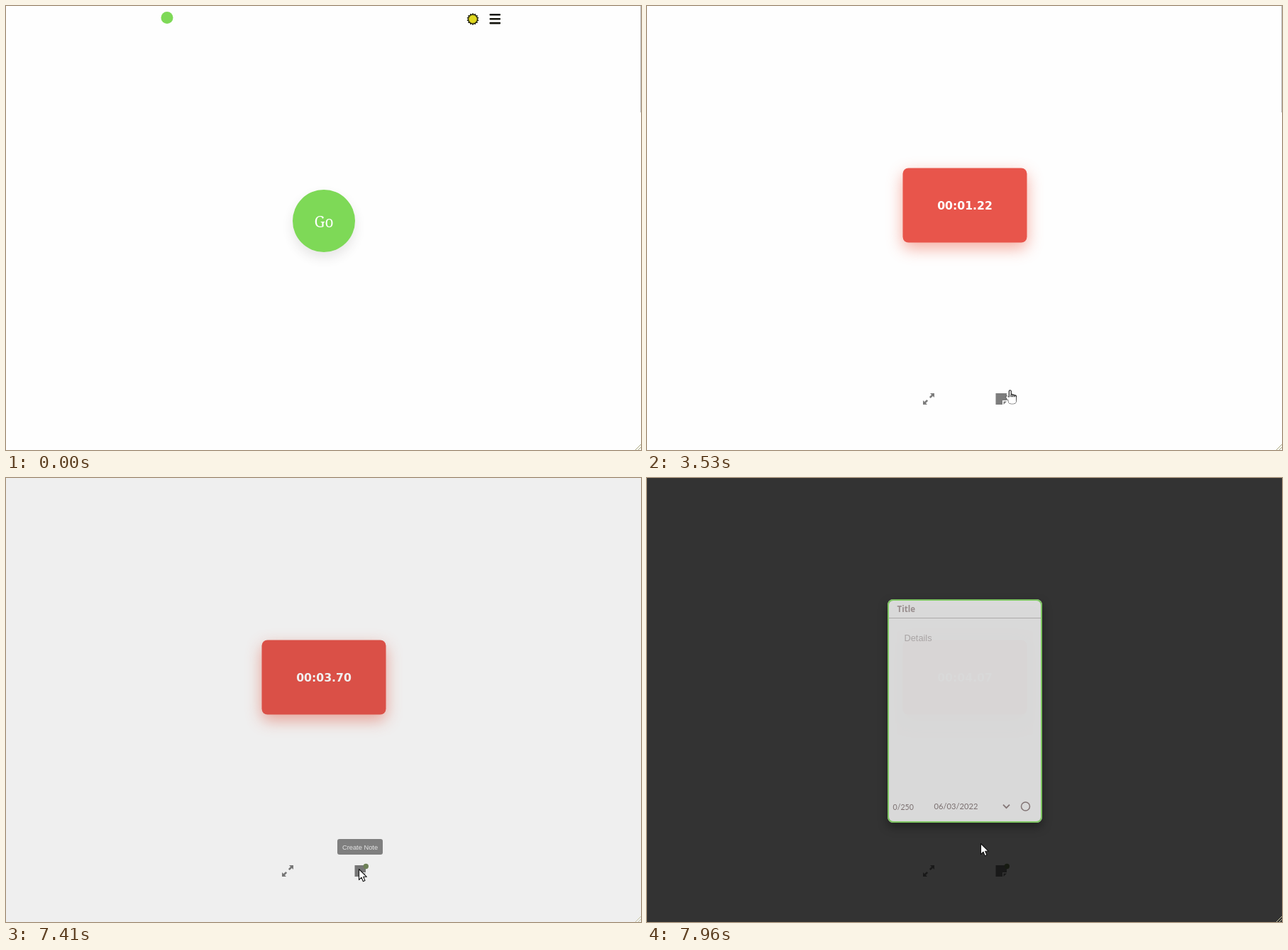
An HTML page with a canvas for the animation above (8000 ms loop, 895 by 626 pixels).

```html
<!DOCTYPE html>
<html lang="en">
<head>
<meta charset="utf-8">
<title>Timer</title>
<style>
html, body { margin: 0; width: 100%; height: 100%; overflow: hidden; background: #fff; }
canvas { display: block; }
</style>
</head>
<body>
<canvas id="stage" width="895" height="626"></canvas>
<script>
const W = 895, H = 626, LOOP = 8000, END = 7960;
const ctx = document.getElementById('stage').getContext('2d');

const SERIF = '"DejaVu Serif", serif';
const SANS = '"DejaVu Sans", sans-serif';
const ARIAL = '"Liberation Sans", sans-serif';
const LATO = 'Lato, sans-serif';

const GREEN = [126, 217, 87], BROWN = [172, 92, 52], RED = [232, 85, 75];
const START = 1636, CLICK = 7310, DIM = 7377, CARD = 7750;
const EXPAND = { x: 397, y: 554 }, NOTE = { x: 499, y: 554 };

// Timer readings: [time, seconds]
const CLOCK = [[START, 0], [3530, 1.22], [5670, 2.64], [7560, 3.8], [END, 4.07]];

// Pointer moves: [start, end, x, y]
const MOVES = [
  [220, 990, 455, 313],
  [1870, 2900, 563, 245],
  [2930, 3607, 510, 552],
  [3607, 3800, 500, 552],
  [4150, 4500, 394, 550],
  [4950, 5760, 497, 551],
  [7560, END, 470, 515]
];

const clamp = v => Math.max(0, Math.min(1, v));
const mix = (a, b, k) => a + (b - a) * k;
const mixRgb = (a, b, k) => a.map((v, i) => mix(v, b[i], k));
const rgb = (c, a = 1) => `rgba(${c.map(Math.round).join(',')},${a})`;
const ramp = (t, from, dur) => clamp((t - from) / dur);
const smooth = k => k * k * (3 - 2 * k);

// The CSS "ease" curve, solved by bisection
function ease(x) {
  let lo = 0, hi = 1;
  for (let i = 0; i < 20; i++) {
    const s = (lo + hi) / 2, q = 1 - s;
    if (.75 * q * s + s ** 3 < x) lo = s; else hi = s;
  }
  const q = 1 - lo;
  return .3 * q * q * lo + 3 * q * lo * lo + lo ** 3;
}

function pointerAt(t) {
  const p = { x: 824, y: 577 };
  for (const [from, to, x, y] of MOVES) {
    const k = smooth(ramp(t, from, to - from));
    p.x = mix(p.x, x, k);
    p.y = mix(p.y, y, k);
  }
  return p;
}

const near = (p, c, rx, ry = rx) => Math.abs(p.x - c.x) < rx && Math.abs(p.y - c.y) < ry;
const overIcon = (t, icon) => t > START && t < CLICK && near(pointerAt(t), icon, 13);

function overButton(t) {
  const p = pointerAt(t);
  return t < START ? Math.hypot(p.x - 448, p.y - 303) < 44 : near(p, { x: 448, y: 281 }, 87, 52);
}

function clockText(t) {
  const i = Math.max(1, CLOCK.findIndex(([time]) => t <= time));
  const [t0, v0] = CLOCK[i - 1], [t1, v1] = CLOCK[i];
  const cs = Math.floor(mix(v0, v1, ramp(t, t0, t1 - t0)) * 100 + 1e-6);
  const pad = n => String(n).padStart(2, '0');
  return `00:${pad(Math.floor(cs / 100))}.${pad(cs % 100)}`;
}

function text(str, x, y, font, color, align = 'center') {
  ctx.font = font;
  ctx.fillStyle = color;
  ctx.textAlign = align;
  ctx.fillText(str, x, y);
}

function box(x, y, w, h, r) {
  ctx.beginPath();
  ctx.roundRect(x, y, w, h, r);
}

function poly(points, close = true) {
  ctx.beginPath();
  points.forEach(([x, y]) => ctx.lineTo(x, y));
  if (close) ctx.closePath();
}

function disc(x, y, r) {
  ctx.beginPath();
  ctx.arc(x, y, r, 0, 7);
}

function layer(alpha, draw) {
  if (alpha <= 0) return;
  ctx.save();
  ctx.globalAlpha = alpha;
  draw();
  ctx.restore();
}

function shadow(color, blur, y) {
  ctx.shadowColor = color;
  ctx.shadowBlur = blur;
  ctx.shadowOffsetY = y;
}

function header() {
  ctx.fillStyle = rgb(GREEN);
  disc(227, 16.5, 8.5);
  ctx.fill();

  const spikes = Array.from({ length: 28 }, (_, i) => {
    const r = i % 2 ? 6 : 7.6, a = i * Math.PI / 14;
    return [658 + r * Math.sin(a), 18.5 - r * Math.cos(a)];
  });
  poly(spikes);
  ctx.fillStyle = '#e0d81f';
  ctx.fill();
  ctx.strokeStyle = '#1c1c08';
  ctx.lineWidth = 1.3;
  ctx.stroke();

  ctx.fillStyle = '#14140c';
  for (let i = 0; i < 3; i++) {
    box(681.5, 11 + 5.9 * i, 15.5, 2.6, 1);
    ctx.fill();
  }
}

function button(t) {
  const running = t >= START;
  const p = running ? ease(ramp(t, START, 485)) : 0;
  const w = mix(88, 175, p), h = mix(88, 105, p), cy = running ? 281 : 303;
  const hot = clamp(p * 4 - 3);
  const color = mixRgb(mixRgb(GREEN, BROWN, clamp(p / .75)), RED, hot);
  const k = Math.sqrt(p);

  ctx.save();
  shadow(rgb(mixRgb([60, 50, 50], [236, 90, 66], hot), mix(.12, .5, hot)), mix(16, 22, hot), 8);
  ctx.fillStyle = rgb(color);
  box(448 - w / 2, cy - h / 2, w, h, { x: mix(w / 2, 8, k), y: mix(h / 2, 8, k) });
  ctx.fill();
  ctx.restore();

  if (!running) text('Go', 448, 311.5, '21px "Noto Serif", serif', '#fff');
  else text(clockText(t), 448, 287, `bold ${mix(9, 15.7, k)}px ${p < .97 ? SERIF : SANS}`, '#fff');
}

function icons(t) {
  ctx.fillStyle = ctx.strokeStyle = '#7d7d7d';
  ctx.lineWidth = 2.6;
  for (const s of [1, -1]) {
    const at = (x, y) => [EXPAND.x + s * x, EXPAND.y - s * y];
    poly([at(8, 8), at(8, 2), at(2, 8)]);
    ctx.fill();
    poly([at(1.8, 1.8), at(6, 6)], false);
    ctx.stroke();
  }
  poly([[491.5, 546], [507, 546], [507, 556], [501, 556], [501, 562], [491.5, 562]]);
  ctx.fill();
  poly([[502.5, 557.5], [507, 557.5], [502.5, 562]]);
  ctx.fill();
  if (t >= CLICK) {
    ctx.fillStyle = '#75895c';
    disc(507.3, 547.5, 3.7);
    ctx.fill();
  }
}

// Fades with the share of recent time spent over the icon
function tooltip(t, label, icon, w) {
  let alpha = 0;
  for (let lag = 100; lag < 240; lag += 14) alpha += overIcon(t - lag, icon) / 10;
  layer(alpha, () => {
    ctx.fillStyle = '#7a7a7a';
    box(icon.x - w / 2, 509, w, 22, 3);
    ctx.fill();
    text(label, icon.x, 523.7, '9.3px ' + ARIAL, '#fff');
  });
}

function noteCard() {
  ctx.save();
  shadow('rgba(0,0,0,.45)', 14, 6);
  ctx.fillStyle = '#fff';
  box(339, 171, 218, 315, 8);
  ctx.fill();
  ctx.restore();
  ctx.strokeStyle = '#6cc24a';
  ctx.lineWidth = 2;
  box(340, 172, 216, 313, 7);
  ctx.stroke();
  ctx.fillStyle = '#a3a0a0';
  ctx.fillRect(341, 197, 214, 1);
  text('Title', 352.5, 188.5, 'bold 11.5px "Open Sans", sans-serif', '#8a7d7d', 'left');
  text('Details', 362.5, 230, '12.8px ' + ARIAL, '#a09a9a', 'left');
  text('0/250', 346.5, 467.5, '10.6px ' + LATO, '#675a5a', 'left');
  text('06/03/2022', 404.5, 467, '11.2px ' + LATO, '#675a5a', 'left');
  ctx.strokeStyle = '#705f5f';
  ctx.lineWidth = 1.8;
  poly([[502, 460.7], [506.5, 465.2], [511, 460.7]], false);
  ctx.stroke();
  ctx.lineWidth = 1.5;
  disc(533.5, 463, 6);
  ctx.stroke();
}

function arrow() {
  poly([[.5, .5], [.5, 15.6], [4, 12.2], [6.4, 17.7], [9, 16.6], [6.7, 11.3], [11.4, 11.3]]);
  ctx.fill();
  ctx.stroke();
}

function hand() {
  const palm = new Path2D(), fingers = new Path2D();
  palm.roundRect(-2.6, 10, 11, 9.5, [2, 0, 4, 4]);
  palm.ellipse(-3.2, 11.8, 1.7, 3.4, -.6, 0, 7);
  fingers.roundRect(-1.6, .5, 3, 13, 1.5);
  for (let i = 1; i < 4; i++) fingers.roundRect(2.4 * i - 1.2, 5.2 + .8 * i, 2.6, 7, 1.3);
  ctx.stroke(palm);
  ctx.fill(fingers);
  ctx.stroke(fingers);
  ctx.fill(palm);
}

function pointer(t) {
  if (t < 220) return;
  const { x, y } = pointerAt(t);
  const link = t < CLICK && (overButton(t) || overIcon(t, EXPAND) || overIcon(t, NOTE));
  ctx.save();
  ctx.translate(x, y);
  ctx.fillStyle = '#fff';
  ctx.strokeStyle = '#111';
  ctx.lineWidth = 1.1;
  ctx.lineJoin = 'round';
  (link ? hand : arrow)();
  ctx.restore();
}

function edges(t) {
  if (t < DIM) {
    ctx.fillStyle = '#bdbdbd';
    ctx.fillRect(894, 0, 1, 150);
  }
  ctx.strokeStyle = t < DIM ? '#a8a67c' : '#c9c7a4';
  ctx.lineWidth = 1;
  for (const d of [8, 4]) {
    poly([[W - d, H], [W, H - d]], false);
    ctx.stroke();
  }
}

function draw(t) {
  ctx.fillStyle = '#fefefe';
  ctx.fillRect(0, 0, W, H);
  layer(1 - ramp(t, 1520, 240), header);
  button(t);
  layer(smooth(ramp(t, START, 500)), () => icons(t));
  tooltip(t, 'Expand', EXPAND, 45.6);
  tooltip(t, 'Create Note', NOTE, 64);
  layer(.8 * ease(ramp(t, DIM, 400)), () => {
    ctx.fillStyle = '#000';
    ctx.fillRect(0, 0, W, H);
  });
  layer(ease(ramp(t, CARD, 400)), noteCard);
  edges(t);
  pointer(t);
}

function tick(now) {
  draw(Math.min(now % LOOP, END));
  requestAnimationFrame(tick);
}
requestAnimationFrame(tick);
</script>
</body>
</html>
```
